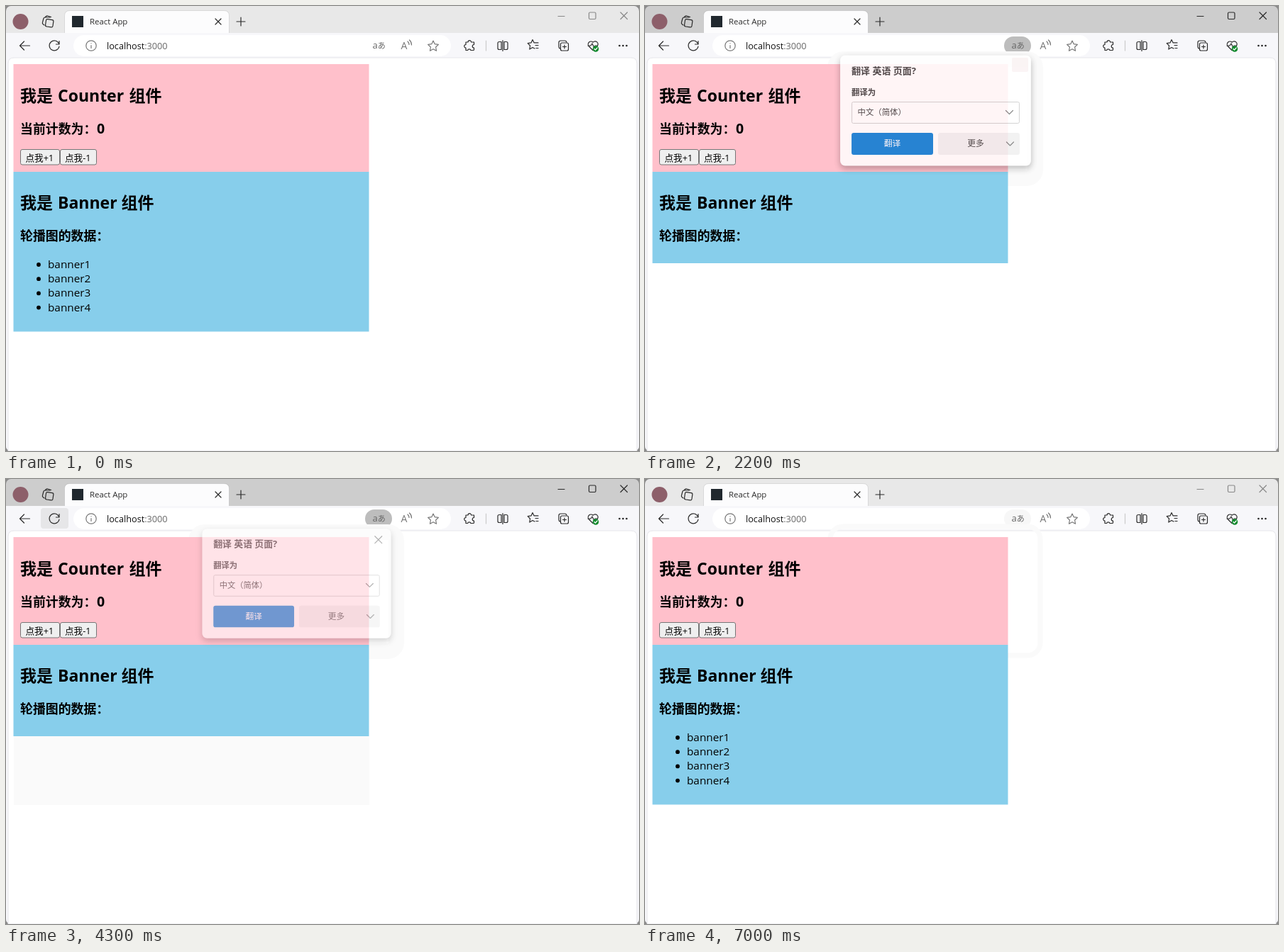
An HTML page for the animation above (7100 ms loop, 892 by 628 pixels).

```html
<!DOCTYPE html>
<html lang="zh-CN">
<head>
<meta charset="utf-8">
<title>React App</title>
<style>
  html, body { margin: 0; width: 100%; height: 100%; overflow: hidden; background: #8a8a8a; }
  svg { display: block; width: 892px; height: 628px; font-family: 'Open Sans', 'Noto Sans CJK SC', sans-serif; }
  .line { fill: none; stroke: #2b2b2b; stroke-width: 1.2; stroke-linecap: round; stroke-linejoin: round; }
  .soft { stroke: #777; }
  .page { font-weight: 700; font-size: 17.9px; }
  .page .h2 { font-size: 23px; }
  .page .plain { font-weight: 400; font-size: 15.3px; }
  .page .button { font-weight: 400; font-size: 12.6px; }
  .button rect { fill: #efefef; stroke: #767676; }
  #popup { transform-origin: 409.5px 148px; filter: drop-shadow(0 4px 5px rgba(0, 0, 0, .32)); font-size: 11.4px; fill: #333; }
</style>
</head>
<body>
<svg viewBox="0 0 892 628">
  <rect id="frame" width="892" height="628" rx="7"/>
  <path d="M0 38H892V621a7 7 0 0 1-7 7H7a7 7 0 0 1-7-7Z" fill="#f7f7fa"/>

  <!-- Tab strip -->
  <circle cx="20.5" cy="22" r="11" fill="#8d5f6a"/>
  <g class="line">
    <rect x="56" y="19" width="10.5" height="10.5" rx="2" transform="rotate(8 61 24)"/>
    <path d="M54 27l-2-1.500q-1-1-.5-2.500l1.500-5.500q.5-1.500 2-1.500h7M55 16l1.500-1.500q1-.7 2-.5l5 1.500"/>
  </g>
  <path d="M82.500 38V14q0-7.500 7.500-7.500H307q7.500 0 7.500 7.500V38" fill="#fcfcfd" stroke="#000" stroke-opacity=".1"/>
  <rect id="favicon" x="93" y="14" width="16" height="16" fill="#20282e"/>
  <circle id="spinner" cx="96" cy="26" r="1.6" fill="#1a73c8"/>
  <text x="118" y="26" font-size="11.4" fill="#2b2b2b">React App</text>
  <path class="line" d="M295 18l8 8m0-8l-8 8M325 22h12M331 16v12"/>
  <g id="controls" class="line">
    <path d="M778 14.500h9M866 9l9.500 9.500m0-9.500l-9.500 9.500"/>
    <rect x="821.5" y="9" width="9.500" height="9.500" rx="1.500"/>
  </g>

  <!-- Toolbar -->
  <rect id="hover" x="49" y="41" width="39" height="29" rx="4" fill="#e6e6e8"/>
  <rect x="95" y="41" width="532" height="30" rx="15" fill="#fff"/>
  <rect id="pill" x="506" y="43" width="38" height="26" rx="13"/>
  <g class="line">
    <path d="M33.500 56H19.500m6-6l-6 6 6 6"/>
    <path d="M74.500 53a7 7 0 1 0 .5 4M75 49.500V54H70.500"/>
    <g class="soft">
      <circle cx="120" cy="56" r="7.200"/>
      <path d="M120 55.500v4M120 52.500v.2"/>
      <path d="M566 50q2 1.800 2 4.500M568.500 48q3 2.500 3 7"/>
      <path d="M602 49l2.200 4.700 5.200.7-3.800 3.600.9 5.200-4.500-2.500-4.500 2.500.9-5.200-3.800-3.600 5.200-.7Z"/>
    </g>
    <path d="M648 51h3a2.300 2.300 0 0 1 4.600 0h3.900v3.500a2.300 2.300 0 0 0 0 4.600v2.400q0 1-1 1h-3.500a2.300 2.300 0 0 0-4.400 0h-2.600v-3.500a2.200 2.200 0 0 1 0-4.500Z"/>
    <path d="M676.500 49v14" stroke="#ccc"/>
    <path d="M698 50.500h-3q-2 0-2 2v7q0 2 2 2h3ZM702 50.500h3q2 0 2 2v7q0 2-2 2h-3ZM700 48.500v15"/>
    <path d="M745 60l-3-1.500-4.200 2.500.8-5-3.400-3.400 4.800-.7 2-4.400 2.200 4.400h5.800M746 55.500h4M747 59.500h3"/>
    <path d="M781 60q-2-.5-2-2.500v-6q0-2.500 2.500-2.500h6q2 0 2.500 2"/>
    <rect x="781.500" y="52" width="11" height="11" rx="2"/>
    <path d="M787 55v5M784.500 57.500h5"/>
    <path d="M827 62.500l-5.500-5.500a4 4 0 0 1 5.700-5.800 4 4 0 0 1 6 5.300M820 56h4l2-3 2.500 5 1.500-2h3"/>
  </g>
  <circle cx="831" cy="60.500" r="4.300" fill="#138a2e"/>
  <path class="line" d="M829 60.500l1.500 1.500 2.700-3" style="stroke:#fff"/>
  <g fill="#222"><circle cx="864.500" cy="56" r="1.300"/><circle cx="869.500" cy="56" r="1.300"/><circle cx="874.500" cy="56" r="1.300"/></g>
  <text x="142" y="60.500" font-size="12.7" fill="#111">localhost<tspan fill="#6a6a6a">:3000</tspan></text>
  <text id="translate" x="516.500" y="60" font-size="13" fill="#666">a<tspan font-size="11">あ</tspan></text>
  <text x="556.500" y="61" font-size="14" fill="#777">A</text>

  <!-- Page -->
  <path d="M3 628V81q0-8 8-8H881q8 0 8 8V628Z" fill="#fff" stroke="#e6e6ea"/>
  <rect id="vacant" x="11" y="363" width="501" height="97" fill="#fafafa"/>
  <rect id="halo" fill="none" stroke="#fafafa"/>
  <g class="page">
    <rect x="10.500" y="82" width="501" height="152" fill="#ffc0cb"/>
    <rect id="banner" x="10.500" y="234" width="501" fill="#87ceeb"/>
    <text class="h2" y="135"><tspan x="20">我是</tspan><tspan x="73">Counter</tspan><tspan x="173.500">组件</tspan></text>
    <text x="20" y="179.500">当前计数为：<tspan x="128" font-size="19.500">0</tspan></text>
    <g class="button">
      <rect x="20.500" y="202.500" width="55" height="21.500" rx="2.500"/><text x="27.500" y="218.500">点我+1</text>
      <rect x="76.500" y="202.500" width="51" height="21.500" rx="2.500"/><text x="83" y="218.500">点我-1</text>
    </g>
    <text class="h2" y="286"><tspan x="20">我是</tspan><tspan x="73">Banner</tspan><tspan x="162.500">组件</tspan></text>
    <text x="20" y="331">轮播图的数据：</text>
    <g id="list" class="plain"></g>
  </g>

  <!-- Translate prompt -->
  <g id="popup">
    <rect x="275" y="69.500" width="269" height="156" rx="7" fill="#fff"/>
    <g font-weight="700">
      <text x="291" y="95.500" font-size="13">翻译 英语 页面?</text>
      <text x="291" y="126">翻译为</text>
    </g>
    <rect x="291.500" y="135.500" width="236" height="30" rx="2" fill="#fff" stroke="#ccc"/>
    <text x="299.500" y="154">中文（简体）</text>
    <rect x="291" y="179" width="115" height="31" rx="3" fill="#0078d4"/>
    <rect x="413" y="179" width="115" height="31" rx="3" fill="#f0f0f0"/>
    <g text-anchor="middle" font-weight="500" font-size="11.8">
      <text x="348.500" y="198.500" fill="#fff">翻译</text>
      <text id="more" x="466" y="198.500">更多</text>
    </g>
    <path class="line soft" d="M508.500 147.500l5 5 5-5M509.500 192l5 5 5-5"/>
    <path id="close" class="line soft" d="M521 80l10 10m0-10l-10 10"/>
    <rect id="closeHover" x="517" y="73" width="23" height="20" rx="2" fill="#fbf3f4"/>
  </g>
</svg>
<script>
const LOOP = 7100, STEP = 100;
const el = id => document.getElementById(id);
const set = (id, attrs) => { for (const key in attrs) el(id).setAttribute(key, attrs[key]); };
const show = (id, visible) => { el(id).style.display = visible ? '' : 'none'; };
const ramp = (t, from, to) => Math.min(1, Math.max(0, (t - from) / (to - from)));
const smooth = p => p * p * (3 - 2 * p);
const easeOut = p => 1 - (1 - p) ** 2;

// Each reload: hover, load, prompt and list times in ms
const reloads = [
  { hover: [300, 600], leave: [1000, 1300], load: [900, 1100], open: [1000, 1300], sharp: 1700, close: [2100, 2500], list: 2800 },
  { hover: [3800, 4000], leave: [4300, 4500], load: [4100, 4300], open: [4200, 4500], sharp: 4800, close: [5000, 5500], list: 6000 }
];

el('list').innerHTML = [1, 2, 3, 4].map(n => {
  const y = 349.8 + n * 20.2;
  return `<circle cx="46" cy="${y - 5}" r="2.9"/><text x="59" y="${y}">banner${n}</text>`;
}).join('');

function draw(t) {
  const second = t >= 3800;
  const r = reloads[+second];
  const active = t >= 800 && t < 7000;
  const loading = t >= r.load[0] && t < r.load[1];
  const listed = t < r.load[0] || t >= r.list;
  const closing = t >= r.close[0];
  const opacity = easeOut(ramp(t, ...r.open)) * (1 - smooth(ramp(t, ...r.close)));

  set('frame', { fill: active ? '#cdcdcd' : '#e8e8e8' });
  set('controls', { opacity: active ? 1 : .5 });
  set('hover', { opacity: ramp(t, ...r.hover) - ramp(t, ...r.leave) });
  show('favicon', !loading);
  show('spinner', loading);
  set('spinner', { transform: `rotate(${(t - r.load[0] - 100) * .4} 101 22)` });
  show('translate', !loading);
  show('pill', !loading && t >= 1100);
  set('pill', { fill: opacity > 0 ? '#bdbdbd' : '#f7f7f7' });

  set('banner', { height: listed ? 225.5 : 129 });
  show('list', listed);
  show('vacant', second && !listed);

  show('halo', t >= 1100);
  set('halo', t >= 5500
    ? { x: 261, y: 67, width: 296, height: 182, rx: 18, 'stroke-width': 7 }
    : { x: 268, y: 75, width: 282, height: 168, rx: 12, 'stroke-width': 22 });

  el('popup').style.opacity = opacity;
  el('popup').style.transform = `scale(${.97 + .035 * opacity})`;
  show('popup', opacity > 0);
  show('close', !closing);
  show('closeHover', closing);
  set('more', { fill: t >= r.sharp ? '#333' : '#444' });
}

function tick(now) {
  draw(Math.floor(now % LOOP / STEP) * STEP);
  requestAnimationFrame(tick);
}
tick(performance.now());
</script>
</body>
</html>
```
